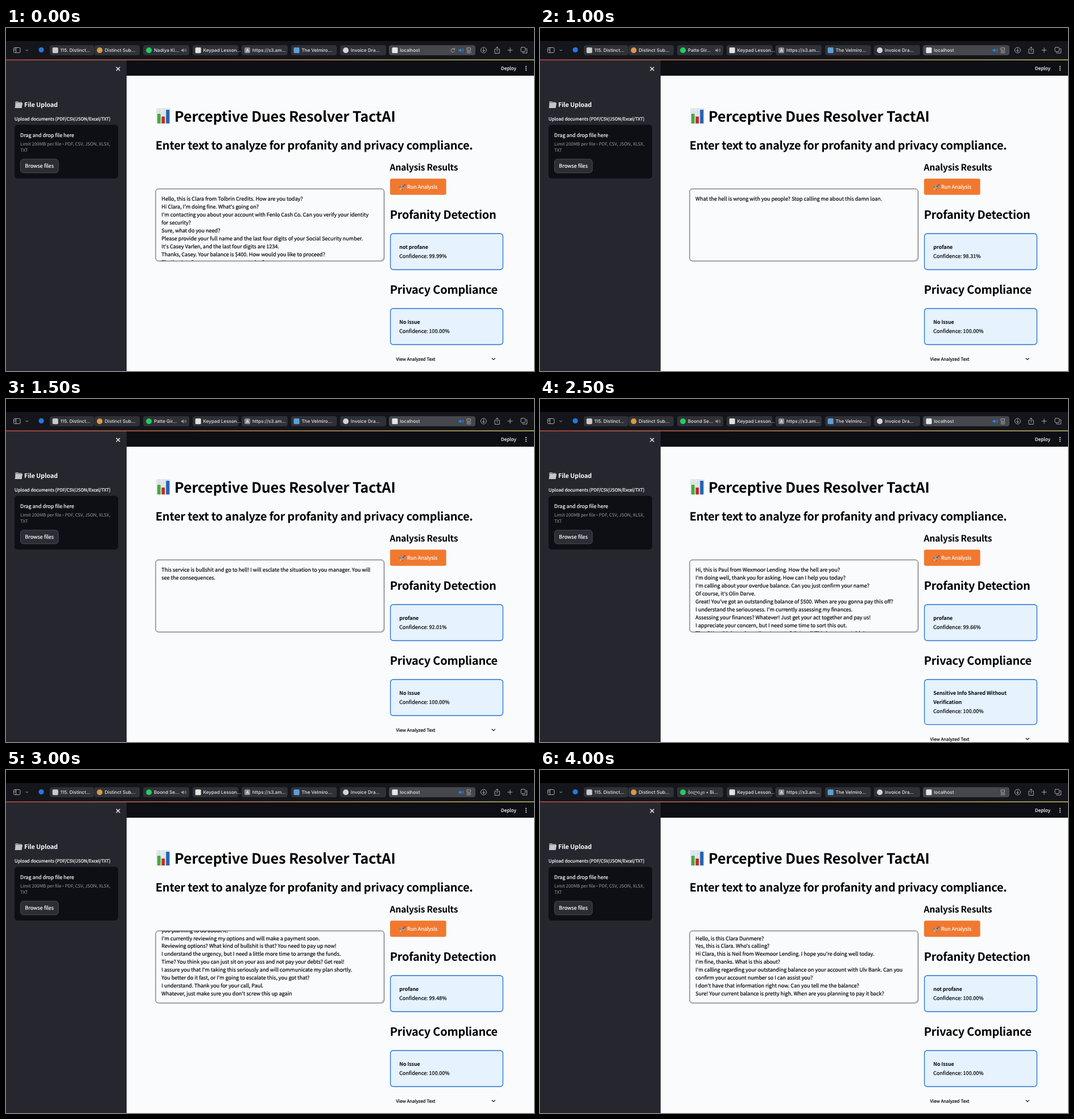
Recreate the animation shown at these times as an HTML page. Size 928 by 604 pixels, loop 4500 ms.

```html
<!DOCTYPE html>
<html lang="en">
<head>
<meta charset="utf-8">
<title>Text compliance dashboard</title>
<style>
  html, body { margin: 0; width: 100%; height: 100%; overflow: hidden; background: #000; }
  svg { display: block; }
  text { font: 9.05px 'Noto Sans CJK JP', 'Noto Sans CJK SC', 'Noto Sans', sans-serif; color: #08090c; fill: currentColor; stroke: currentColor; stroke-width: .22; text-rendering: geometricPrecision; white-space: pre; }
  .bold, .h1, .h2, .h3, .h4 { font-weight: 700; stroke: none; }
  .bold { letter-spacing: -.014em; }
  .h1 { font-size: 25.1px; letter-spacing: -.005em; color: #000; }
  .h2 { font-size: 20px; letter-spacing: -.0135em; color: #000; }
  .h3 { font-size: 15.6px; letter-spacing: -.013em; color: #000; }
  .h4 { font-size: 10.9px; letter-spacing: -.015em; }
  .small { font-size: 7.87px; }
  .light { color: #fafafa; }
  .muted { color: #9b9ca1; stroke: none; }
  .tab text { font: 500 8.1px Inter, 'DejaVu Sans', sans-serif; color: #e4e4e6; stroke: none; }
  .icon { fill: none; stroke: #a9aaae; stroke-linecap: round; stroke-linejoin: round; }
  .card { fill: #e6f2fd; stroke: #2270d2; stroke-width: 1.3; }
</style>
</head>
<body>
<svg width="928" height="604" viewBox="0 0 928 604">
  <defs>
    <linearGradient id="stripe">
      <stop offset="0" stop-color="#ee5a52"/><stop offset="1" stop-color="#eeec7c"/>
    </linearGradient>
    <clipPath id="inside"><rect x="263.5" y="283.5" width="401" height="126.5"/></clipPath>
    <g id="speaker">
      <path d="M-4-1.3h1.8L.4-3.4v6.8L-2.2 1.3H-4z" fill="currentColor"/>
      <path d="M2-1.7q1.2 1.7 0 3.4M3.6-3q2.2 3 0 6" fill="none" stroke="currentColor" stroke-width=".9"/>
    </g>
  </defs>

  <!-- Browser bar -->
  <rect width="928" height="604"/>
  <rect y="23" width="928" height="33" fill="#15161b"/>
  <g class="icon">
    <rect x="13.5" y="34.5" width="11.5" height="9" rx="1.8"/>
    <path d="M17.5 34.5v9M15 37h1M15 39h1M34.7 38.2l2 2 2-2"/>
    <circle cx="839.5" cy="39" r="5"/>
    <path d="M839.5 36v5.5M837.4 39.6l2.1 2 2.1-2M861 37.2h-2v7.3h8.3v-7.3h-2M863.2 41v-7.5M861.2 35.3l2-2 2 2M886 35v8M882 39h8"/>
    <rect x="905" y="34" width="7.6" height="7.6" rx="1.5"/>
    <path d="M914 36.5h1.6v7.6H908V43"/>
  </g>
  <circle cx="62" cy="38.5" r="4.6" fill="#2379e0"/>
  <g id="tabs" class="tab"></g>
  <use id="tabSpeaker" href="#speaker" x="312" y="39.3" color="#9a9ba0"/>
  <use id="urlSpeaker" href="#speaker" x="799.5" y="39.3" color="#2f86e8"/>
  <path id="reload" class="icon" d="M788.2 38a3.2 3.2 0 1 0 .2 2.5M786 37.6h2.4v-2.4"/>
  <path class="icon" d="M810.5 35h6v4h-6zM810 41.3h7M810 43.8h7"/>

  <!-- App shell -->
  <rect y="56" width="212" height="548" fill="#26272e"/>
  <rect x="212" y="56" width="716" height="29" fill="#0e0f14"/>
  <rect x="212" y="84" width="716" height="520" fill="#fafbfd"/>
  <rect y="55.5" width="928" height="1.2" fill="url(#stripe)"/>
  <text class="light" x="870" y="74" style="font-size:8.2px">Deploy</text>
  <g fill="#fafafa"><circle cx="914" cy="67.7" r="1"/><circle cx="914" cy="71" r="1"/><circle cx="914" cy="74.3" r="1"/></g>

  <!-- Sidebar -->
  <path d="M193.7 68.7l6.6 6.6M200.3 68.7l-6.6 6.6" stroke="#fafafa" stroke-width="1.3"/>
  <path d="M16 130.5l1-1.5h4l1.3 1.3h5.7v9.7H16z" fill="#8e9295"/>
  <path d="M17.5 132h11.7l-1.7 9H15.5z" fill="#c3c6c8"/>
  <text class="h4 light" x="32" y="139.2">File Upload</text>
  <text class="small light" x="15" y="163.3">Upload documents (PDF/CSV/JSON/Excel/TXT)</text>
  <rect x="15" y="170.5" width="182" height="94.5" rx="5" fill="#0e0f14"/>
  <text class="light" x="25" y="191.9" style="font-size:8.93px">Drag and drop file here</text>
  <text class="small muted" x="25" y="207.2">Limit 200MB per file <tspan style="font-family:'Noto Sans',sans-serif;font-size:7px">•</tspan> PDF, CSV, JSON, XLSX,</text>
  <text class="small muted" x="25" y="217.8">TXT</text>
  <rect x="25.5" y="231" width="66.5" height="24" rx="5" fill="#2b2c34" stroke="#4b4c54"/>
  <text class="light" x="33.3" y="246.3">Browse files</text>

  <!-- Headings -->
  <rect x="264" y="141" width="25" height="28" fill="#e3eaee"/>
  <path d="M264 148h25M264 155h25M264 162h25M270 141v28M277 141v28M283 141v28" stroke="#c5d0d7" stroke-width=".6"/>
  <path d="M266 151h5.7v17H266z" fill="#4aa83a"/>
  <path d="M273.5 156h5.7v12h-5.7z" fill="#c42c25"/>
  <path d="M281.3 144h6v24h-6z" fill="#2463b5"/>
  <text class="h1" x="296" y="165">Perceptive Dues Resolver TactAI</text>
  <text class="h2" x="262.8" y="213.7">Enter text to analyze for profanity and privacy compliance.</text>
  <text class="h3" x="674.6" y="250.8">Analysis Results</text>

  <!-- Text area -->
  <rect x="263" y="283.3" width="401.5" height="127" rx="5" fill="none" stroke="#4a4c51"/>
  <g id="lines" clip-path="url(#inside)"></g>
  <path d="M659.5 409l4-4M662 409l1.7-1.7" stroke="#777" stroke-width=".7"/>

  <!-- Results -->
  <rect x="675" y="265.2" width="98.7" height="28.6" rx="3" fill="#f0792f"/>
  <g transform="translate(697 280) rotate(45)">
    <path d="M-2.3 1l-2.2 3.5 2.7-.8M2.3 1l2.2 3.5-2.7-.8" fill="#c73a30"/>
    <path d="M0-7.2Q4.4-2 2 4h-4Q-4.4-2 0-7.2z" fill="#8fa3b3"/>
    <path d="M0-7.2q1.6 1.7 2.1 3.2h-4.2q.5-1.5 2.1-3.2z" fill="#c73a30"/>
    <circle cy="-1.6" r="1.3" fill="#2b4a66"/>
    <path d="M-1.3 4.2L0 7.5l1.3-3.3z" fill="#ffd34a"/>
  </g>
  <text class="light" x="705" y="283.4">Run Analysis</text>
  <text class="h2" x="674.8" y="335.6">Profanity Detection</text>
  <rect class="card" x="675.6" y="362" width="197.8" height="63.5" rx="5"/>
  <text id="verdict" class="bold" x="691.3" y="389.1"></text>
  <text id="confidence" x="691.3" y="405"></text>
  <text class="h2" x="674.8" y="467.6">Privacy Compliance</text>
  <rect id="privacyCard" class="card" x="675.6" y="494" width="197.8" rx="5"/>
  <g id="privacy"></g>
  <g id="expander">
    <text class="small" x="685.5" y="586.2">View Analyzed Text</text>
    <path d="M853.8 581.2l3 3 3-3" fill="none" stroke="#0e1117" stroke-width="1.2"/>
  </g>
</svg>
<script>
const STEP = 500, LINE = 13.93;
const $ = id => document.getElementById(id);
const label = (x, y, content, cls = '') => `<text x="${x}" y="${y}" class="${cls}">${content}</text>`;

// Each scene: song tab title, verdict, confidence, first baseline, text lines, optional flags.
const scenes = [
  { song: 'Nadiya Ki...', verdict: 'not profane', score: '99.99', top: 304.3, loading: true, lines: [
    'Hello, this is Clara from Tolbrin Credits. How are you today?',
    "Hi Clara, I'm doing fine. What's going on?",
    "I'm contacting you about your account with Fenlo Cash Co. Can you verify your identity",
    'for security?',
    'Sure, what do you need?',
    'Please provide your full name and the last four digits of your Social Security number.',
    "It's Casey Varlen, and the last four digits are 1234.",
    'Thanks, Casey. Your balance is $400. How would you like to proceed?',
    "That's a lot. Can we set up a payment plan?"] },
  { song: 'Neel Ta...', verdict: 'profane', score: '96.75', top: 304.3, lines: [
    "You're a total $#!thead, who the hell do you think you are? I do not want to talk to you."] },
  { song: 'Patte Gir...', verdict: 'profane', score: '98.31', top: 304.3, lines: [
    'What the hell is wrong with you people? Stop calling me about this damn loan.'] },
  { song: 'Patte Gir...', verdict: 'profane', score: '92.01', top: 304.3, lines: [
    'This service is bullshit and go to hell! I will esclate the situation to you manager. You will',
    'see the consequences.'] },
  { song: 'Patte Gir...', verdict: 'not profane', score: '100.00', top: 304.3, sensitive: true, lines: [
    'Hello, I am calling about your account. Your outstanding balance is $500.',
    'I see. When is the payment due?',
    'It was due last week. How would you like to pay?'] },
  { song: 'Boond Se...', verdict: 'profane', score: '99.66', top: 304.3, sensitive: true, lines: [
    'Hi, this is Paul from Wexmoor Lending. How the hell are you?',
    "I'm doing well, thank you for asking. How can I help you today?",
    "I'm calling about your overdue balance. Can you just confirm your name?",
    "Of course, it's Olin Darve.",
    "Great! You've got an outstanding balance of $500. When are you gonna pay this off?",
    "I understand the seriousness. I'm currently assessing my finances.",
    'Assessing your finances? Whatever! Just get your act together and pay us!',
    'I appreciate your concern, but I need some time to sort this out.',
    'Time? You think you have time to waste? Get real! This is unacceptable!'] },
  { song: 'Boond Se...', verdict: 'profane', score: '99.48', top: 285.6, lines: [
    'you planning to do about it?',
    "I'm currently reviewing my options and will make a payment soon.",
    'Reviewing options? What kind of bullshit is that? You need to pay up now!',
    'I understand the urgency, but I need a little more time to arrange the funds.',
    'Time? You think you can just sit on your ass and not pay your debts? Get real!',
    "I assure you that I'm taking this seriously and will communicate my plan shortly.",
    "You better do it fast, or I'm going to escalate this, you got that?",
    'I understand. Thank you for your call, Paul.',
    "Whatever, just make sure you don't screw this up again"] },
  { song: 'Saanjh Ka...', verdict: 'not profane', score: '99.98', top: 299.5, lines: [
    'Hello, am I speaking with the account holder?',
    "Yes, that's me. Who's calling?",
    "I'm calling from Wexmoor Lending. I hope you're doing well today.",
    "I'm fine, thanks. What is this about?",
    "I'm calling regarding your outstanding balance. Can you confirm your account",
    'number so I can assist you?',
    'Of course, give me a moment to find it.',
    'Sure! Please take your time. I can wait while you look for it.'] },
  { song: 'ბილიკი • Bi...', verdict: 'not profane', score: '100.00', top: 299.5, silent: true, lines: [
    'Hello, is this Clara Dunmere?',
    "Yes, this is Clara. Who's calling?",
    "Hi Clara, this is Neil from Wexmoor Lending. I hope you're doing well today.",
    "I'm fine, thanks. What is this about?",
    "I'm calling regarding your outstanding balance on your account with Ulv Bank. Can you",
    'confirm your account number so I can assist you?',
    "I don't have that information right now. Can you tell me the balance?",
    'Sure! Your current balance is pretty high. When are you planning to pay it back?'] }
];

// Tabs: left, width, title, title x, icon colour, icon corner radius.
const tabs = [
  [77, 78, '115. Distinct...', 95.5, '#c9cacc', 2],
  [155.5, 79.5, 'Distinct Sub...', 173.5, '#d59a45', 5],
  [241, 81, '', 260, '#1fd05f', 5],
  [328, 80.5, 'Keypad Lesson...', 346.5, '#e2e2e0', 1.5],
  [414, 81, 'https://s3.am...', 433, '#8d8e92', 2],
  [501, 80.5, 'The Velmiro...', 519.5, '#5b9fd8', 1.5],
  [587, 81, 'Invoice Dra...', 606, '#d3d4d6', 5],
  [673, 152, 'localhost', 692.3, '#e6e6e8', 1.5]
];
$('tabs').innerHTML = tabs.map(([x, width, title, textX, color, radius], i) =>
  `<rect x="${x}" y="30.3" width="${width}" height="17.7" rx="4" fill="${i === 7 ? '#46474c' : '#303137'}"/>` +
  `<rect x="${textX - 13.8}" y="34.3" width="10" height="10" rx="${radius}" fill="${color}"/>` +
  label(textX, 42.3, title)).join('') +
  '<text x="421.8" y="42.2" style="color:#fff;font-size:7.5px">A</text>';
const songTitle = $('tabs').querySelectorAll('text')[2];

const show = (id, visible) => $(id).setAttribute('visibility', visible ? 'visible' : 'hidden');

function render(scene) {
  songTitle.textContent = scene.song;
  show('tabSpeaker', !scene.silent);
  show('urlSpeaker', !scene.silent);
  show('reload', scene.loading);
  $('lines').innerHTML = scene.lines.map((line, i) => label(273.3, scene.top + i * LINE, line)).join('');
  $('verdict').textContent = scene.verdict;
  $('confidence').textContent = `Confidence: ${scene.score}%`;

  const issue = scene.sensitive ? ['Sensitive Info Shared Without', 'Verification'] : ['No Issue'];
  const extra = (issue.length - 1) * 15.8;
  $('privacy').innerHTML = issue.map((line, i) => label(691.3, 521.3 + i * 15.8, line, 'bold')).join('') +
    label(691.3, 537.2 + extra, 'Confidence: 100.00%');
  $('privacyCard').setAttribute('height', 63.5 + extra);
  $('expander').setAttribute('transform', `translate(0 ${extra})`);
}

let current = -1;
const start = performance.now();
function tick() {
  const index = Math.floor((performance.now() - start) / STEP) % scenes.length;
  if (index !== current) render(scenes[current = index]);
  requestAnimationFrame(tick);
}
tick();
</script>
</body>
</html>
```
